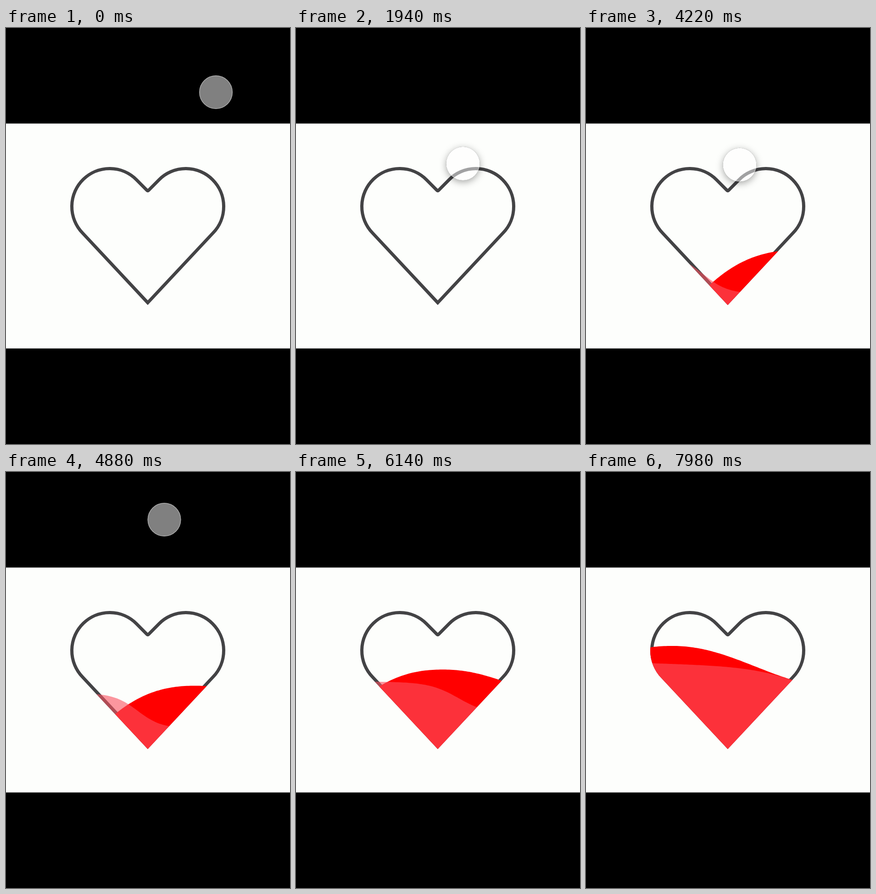
Animation, 619 px wide and 904 px high, one loop 8000 ms. Source, as an HTML page with a canvas:

```html
<!DOCTYPE html>
<html lang="en">
<head>
<meta charset="utf-8">
<title>Filling heart</title>
<style>
  html, body { margin: 0; width: 100%; height: 100%; overflow: hidden; background: #000; }
  canvas { display: block; }
</style>
</head>
<body>
<canvas id="stage" width="619" height="904"></canvas>
<script>
const ctx = document.getElementById('stage').getContext('2d');
const LOOP = 8000;

// Stops along the pointer's way
const pointerStops = [
  { t: 1500, x: 457.5, y: 139.5 },
  { t: 1940, x: 364, y: 294.5 },
  { t: 2700, x: 322, y: 389 },
  { t: 3940, x: 322, y: 389 },
  { t: 4700, x: 357, y: 141 },
  { t: 5400, x: 310.5, y: -4 }
];

// Heart outline, grown outward by `grow`
function heartPath(grow) {
  const path = new Path2D();
  const radius = 82.5 + grow, cy = 388, notch = 354.5 - grow * 1.4;
  path.moveTo(309, 597 + grow * 1.45);
  path.arc(226, cy, radius, Math.PI * 0.755, Math.PI * 1.75);
  path.lineTo(307, notch - 2);
  path.quadraticCurveTo(309, notch, 311, notch - 2);
  path.arc(392, cy, radius, Math.PI * 1.25, Math.PI * 2.245);
  path.closePath();
  return path;
}
const outline = heartPath(0);
const outer = heartPath(3.5);
const arrow = new Path2D('M0 -1V16L4 12.5L7.5 21.5L11.5 20L8 12H16.5Z');

// Red crest running left: gentle cosine behind it, steeper slope ahead
function backWave(t) {
  const left = 7980 - t;
  const crestX = 190 + 0.0724 * left;
  const crestY = 378 + 0.0279 * left;
  return x => {
    const d = x - crestX;
    return crestY + (d < 0 ? 3.23e-4 * (-d) ** 2.35 : 45 * (1 - Math.cos(d * 0.00873)));
  };
}

// Translucent S-shaped slope running right, flattening as it rises
function frontWave(t) {
  const s = (t - 4220) / 1000;
  const middle = 256 + 44.5 * s + 3.5 * s * s;
  const top = 493 - 19 * s;
  const height = 70 + 0.0115 * Math.max(0, 5500 - t);
  const calm = ((t - 4700) / 3280) ** 2;
  const spread = 26 + 30 * calm;
  return x => top + height / (1 + Math.exp((middle - x) / spread)) + 0.03 * calm * (x - 350);
}

function fillBelow(wave, color) {
  ctx.beginPath();
  ctx.moveTo(130, 700);
  for (let x = 130; x <= 490; x += 4) ctx.lineTo(x, wave(x));
  ctx.lineTo(490, 700);
  ctx.fillStyle = color;
  ctx.fill();
}

function drawWaves(t) {
  ctx.save();
  ctx.clip(outer);
  fillBelow(backWave(t), '#f00');
  fillBelow(frontWave(t), 'rgba(250,82,98,0.6)');
  ctx.restore();
}

function pointerAt(t) {
  const i = pointerStops.findIndex(stop => stop.t > t);
  if (i < 0) return pointerStops[pointerStops.length - 1];
  if (i === 0) return pointerStops[0];
  const a = pointerStops[i - 1], b = pointerStops[i];
  const k = (t - a.t) / (b.t - a.t);
  return { x: a.x + (b.x - a.x) * k, y: a.y + (b.y - a.y) * k };
}

function drawTouch({ x, y }) {
  const disc = new Path2D();
  disc.arc(x, y, 36.5, 0, Math.PI * 2);

  // Shadow only outside the disc
  const outside = new Path2D();
  outside.rect(0, 0, 619, 904);
  outside.addPath(disc);
  ctx.save();
  ctx.clip(outside, 'evenodd');
  ctx.shadowColor = 'rgba(0,0,0,0.35)';
  ctx.shadowBlur = 16;
  ctx.shadowOffsetY = 4;
  ctx.fillStyle = '#000';
  ctx.fill(disc);
  ctx.restore();

  ctx.fillStyle = 'rgba(255,255,255,0.5)';
  ctx.fill(disc);
  ctx.beginPath();
  ctx.arc(x, y, 35.8, 0, Math.PI * 2);
  ctx.strokeStyle = 'rgba(255,255,255,0.35)';
  ctx.lineWidth = 1.4;
  ctx.stroke();
}

function drawArrow({ x, y }) {
  ctx.save();
  ctx.translate(x, y);
  ctx.fillStyle = '#000';
  ctx.strokeStyle = '#fff';
  ctx.lineWidth = 1.6;
  ctx.fill(arrow);
  ctx.stroke(arrow);
  ctx.restore();
}

function draw(t) {
  ctx.fillStyle = '#000';
  ctx.fillRect(0, 0, 619, 904);
  ctx.fillStyle = '#fdfefc';
  ctx.fillRect(0, 207.6, 619, 488.8);

  ctx.strokeStyle = '#434345';
  ctx.lineWidth = 7;
  ctx.stroke(outline);
  drawWaves(t);

  const pointer = pointerAt(t);
  if (t < 5300) drawTouch(pointer);
  else if (t < 5600) drawArrow(pointer);
}

function tick() {
  draw(performance.now() % LOOP);
  requestAnimationFrame(tick);
}
tick();
</script>
</body>
</html>
```
